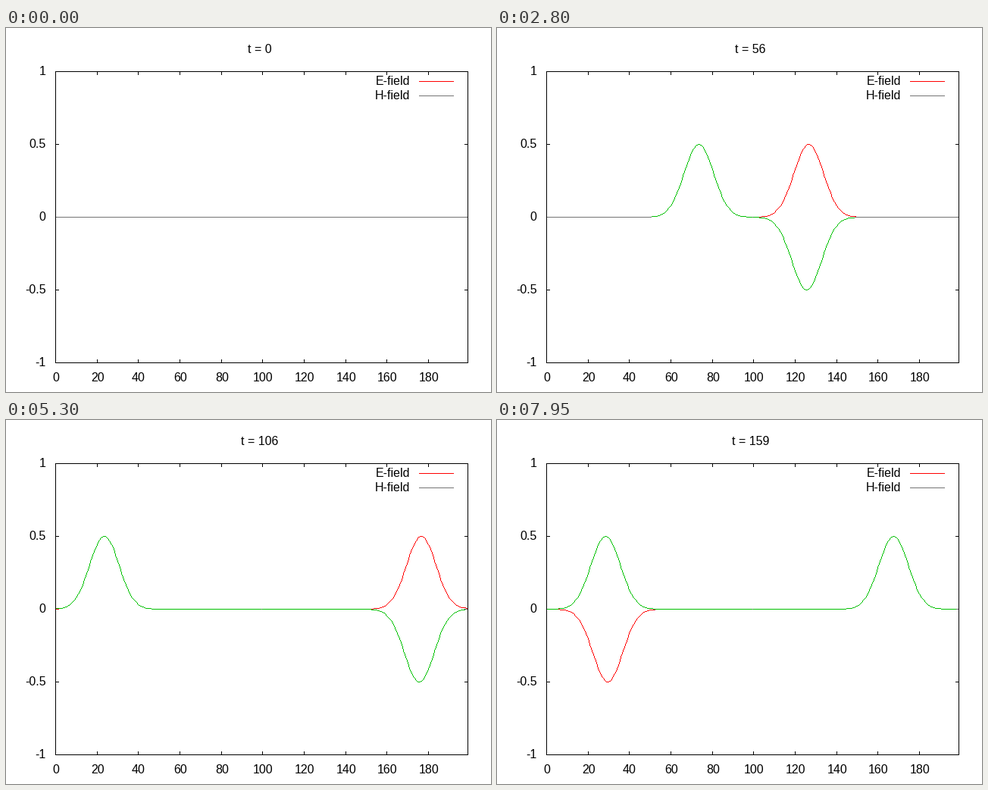
A matplotlib script that plays this animation: 640 px wide and 480 px high, repeating every 8000 ms.

```python
import numpy as np
import matplotlib.pyplot as plt
from matplotlib.animation import FuncAnimation

W, H = 640, 480
LEFT, RIGHT, TOP, BOTTOM, ZERO = 65, 609, 57, 441, 249
CELLS, STEPS, SOURCE = 200, 160, 100
RED, GREEN, GREY, BLACK = (255, 0, 0), (0, 192, 0), (116, 116, 116), (0, 0, 0)


def to_px(v):
    return np.floor(np.asarray(v) + 0.5).astype(int)


def px_x(cell):
    return to_px(LEFT + cell * (RIGHT - LEFT) / (CELLS - 1))


def px_y(value):
    return to_px(ZERO - np.clip(value, -1, 1) * (BOTTOM - ZERO))


def simulate():
    """One-dimensional wave on a staggered grid, with a soft Gaussian source."""
    e, h = np.zeros(CELLS), np.zeros(CELLS)
    for t in range(STEPS):
        h[:-2] += e[1:-1] - e[:-2]
        e[1:-1] += h[1:-1] - h[:-2]
        e[SOURCE] += np.exp(-(t - 30) ** 2 / 100)
        yield e.copy(), h.copy()


def trace(values):
    """Pixels of a one-pixel polyline through the values."""
    xs, ys = px_x(np.arange(CELLS)), px_y(values)
    cols, rows = [], []
    for x0, y0, x1, y1 in zip(xs[:-1], ys[:-1], xs[1:], ys[1:]):
        n = max(abs(x1 - x0), abs(y1 - y0)) + 1
        cols.append(np.linspace(x0, x1, n))
        rows.append(np.linspace(y0, y1, n))
    return to_px(np.concatenate(rows)), to_px(np.concatenate(cols))


def draw_border(img):
    img[[TOP, BOTTOM], LEFT:RIGHT + 1] = BLACK
    img[TOP:BOTTOM + 1, [LEFT, RIGHT]] = BLACK


def make_base():
    img = np.full((H, W, 3), 255, np.uint8)
    for x in px_x(np.arange(0, CELLS, 20)):
        img[TOP:TOP + 5, x] = BLACK
        img[BOTTOM - 4:BOTTOM + 1, x] = BLACK
    for y in px_y(np.arange(-1, 1.1, 0.5)):
        img[y, LEFT:LEFT + 5] = BLACK
        img[y, RIGHT - 4:RIGHT + 1] = BLACK
    img[70, 545:591] = RED
    img[89, 545:591] = GREY
    return img


def make_curves():
    """Pixels of both curves, plus the rest-line columns not yet disturbed."""
    still = np.ones(W, bool)
    curves = []
    for e, h in simulate():
        e_px, h_px = trace(e), trace(h)
        on_zero = np.zeros(W, bool)
        on_zero[h_px[1][h_px[0] == ZERO]] = True
        still = still & on_zero
        curves.append((e_px, h_px, still))
    return curves


base = make_base()
curves = make_curves()

fig = plt.figure(figsize=(6.4, 4.8), dpi=100, facecolor="white")
ax = fig.add_axes([0, 0, 1, 1])
ax.axis("off")
picture = ax.imshow(base, interpolation="nearest", aspect="auto",
                    extent=(0, W, H, 0))
ax.set_xlim(0, W)
ax.set_ylim(H, 0)


def label(x, y, text, ha):
    return ax.text(x, y, text, ha=ha, va="baseline", color="black",
                   family="Liberation Sans", size=11.52)


for cell in range(0, CELLS, 20):
    label(px_x(cell) + 1, 466, str(cell), "center")
for value in (-1, -0.5, 0, 0.5, 1):
    label(52.5, px_y(value) + 5.5, f"{value:g}", "right")
label(533.5, 75, "E-field", "right")
label(533.5, 94, "H-field", "right")
title = label(334.5, 33, "t = 0", "center")


def draw(t):
    e_px, h_px, still = curves[t]
    img = base.copy()
    img[e_px] = RED
    img[h_px] = GREEN
    img[ZERO, still] = GREY
    draw_border(img)
    picture.set_data(img)
    title.set_text(f"t = {t}")
    return picture, title


anim = FuncAnimation(fig, draw, frames=STEPS, interval=50, repeat=True,
                     repeat_delay=0, blit=False)
plt.show()
```
